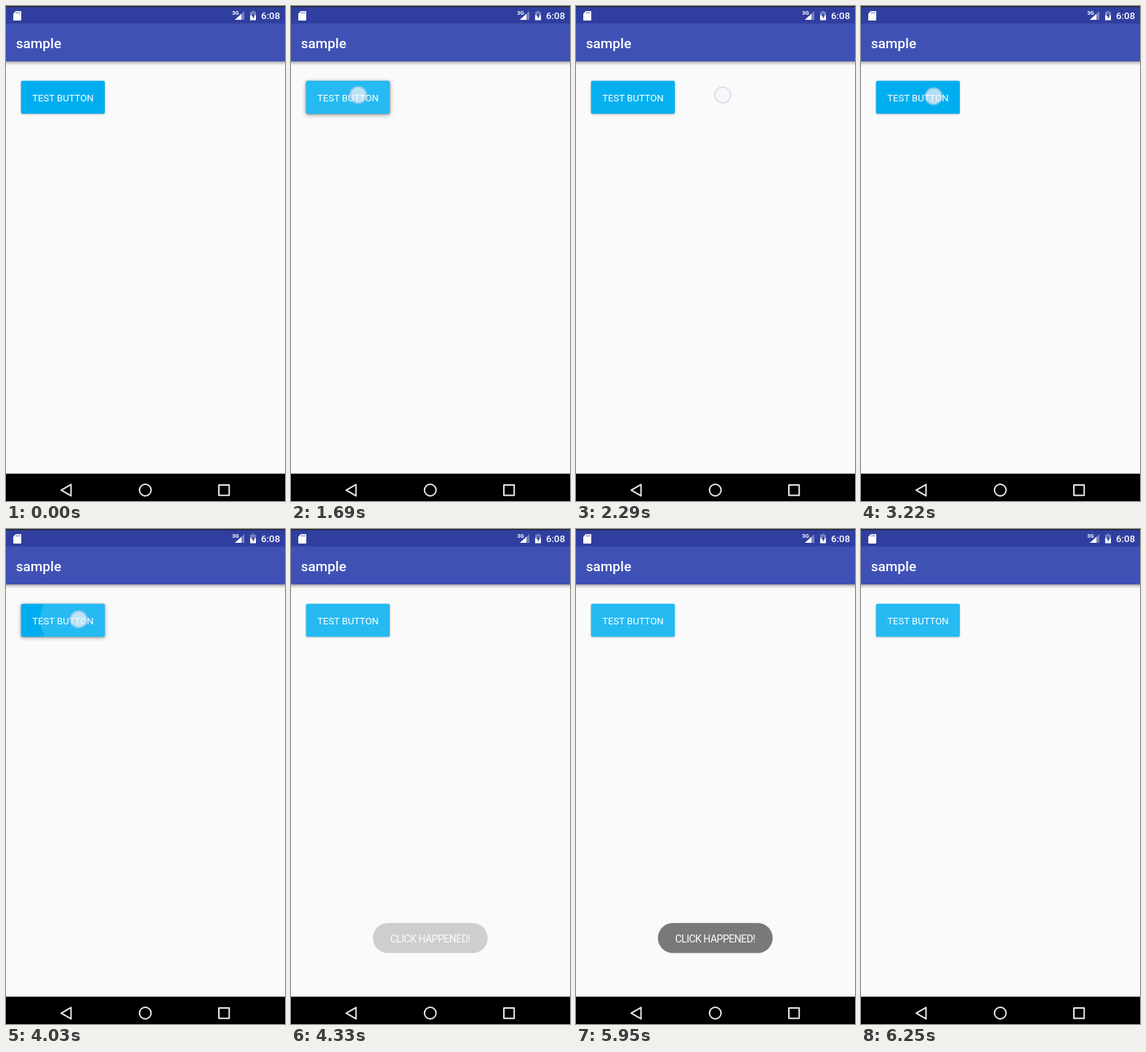
Write an HTML page that moves like this. It is 384 px wide and 680 px high and loops after 6280 ms.

```html
<!DOCTYPE html>
<html lang="en">
<head>
<meta charset="utf-8">
<title>Button press demo</title>
<style>
  html, body { margin: 0; width: 100%; height: 100%; overflow: hidden; background: #fafafa; }
  svg { display: block; font-family: Roboto, sans-serif; }
</style>
</head>
<body>
<svg width="384" height="680" viewBox="0 0 384 680" fill="#fff">
  <defs>
    <linearGradient id="fade" x2="0" y2="1">
      <stop stop-opacity=".38"/>
      <stop offset=".35" stop-opacity=".17"/>
      <stop offset="1" stop-opacity="0"/>
    </linearGradient>
    <filter id="soft" x="-20%" y="-40%" width="140%" height="180%"><feGaussianBlur stdDeviation="3"/></filter>
    <filter id="thin" x="-20%" y="-40%" width="140%" height="180%"><feGaussianBlur stdDeviation=".8"/></filter>
    <rect id="box" x="20.7" y="102.7" width="115.300" height="45.200" rx="2"/>
    <clipPath id="clip"><use href="#box"/></clipPath>
  </defs>

  <!-- status and app bars -->
  <rect y="76" width="384" height="6" fill="url(#fade)"/>
  <rect y="24" width="384" height="52" fill="#3f51b5"/>
  <rect width="384" height="24" fill="#303f9f"/>
  <rect width="384" height="1.500" fill="#25272f"/>
  <path d="M13.500 7H20a1 1 0 0 1 1 1V19a1 1 0 0 1-1 1H11a1 1 0 0 1-1-1V10.500Z"/>
  <path d="M14.200 8.200v2.300M16.300 8.200v2.300M18.400 8.200v2.300" stroke="#303f9f" stroke-width=".8"/>
  <text x="311.300" y="12.300" font-size="7.500" font-weight="700">3G</text>
  <path d="M328 7V19H315Z" opacity=".35"/>
  <path d="M324 10.700V19H315Z"/>
  <path d="M338.500 6.500h3V8H344v5h-8V8h2.500Z" opacity=".35"/>
  <path d="M336 12.500h8V19.500h-8Z"/>
  <path d="M341 9l-3.200 5h1.900v3.800l3-5h-1.700Z" fill="#303f9f"/>
  <text x="351" y="18" font-size="13.300" font-weight="500">6:08</text>
  <text x="13.700" y="58" font-size="19" font-weight="500">sample</text>

  <!-- button -->
  <g id="lift" fill="#000">
    <use href="#box" y="1.500" filter="url(#soft)" opacity=".36"/>
  </g>
  <g fill="#000">
    <use href="#box" y=".8" filter="url(#thin)" opacity=".28"/>
  </g>
  <use href="#box" fill="#00aeef"/>
  <g clip-path="url(#clip)"><circle id="ripple" cy="124" fill-opacity=".15"/></g>
  <text x="36.200" y="130.600" font-size="13.100">TEST BUTTON</text>

  <!-- navigation bar -->
  <rect y="642.500" width="384" height="37.500" fill="#000"/>
  <g fill="none" stroke="#e8e8e8" stroke-width="2" stroke-linejoin="round">
    <path d="M89.500 657.300V672.900L76 665.100Z"/>
    <circle cx="191.700" cy="665" r="8"/>
    <rect x="293" y="658" width="14.200" height="14.200"/>
  </g>

  <g id="toast">
    <rect x="112.700" y="541.300" width="158" height="41.200" rx="20.600" fill="#757575"/>
    <text x="136.500" y="567.700" font-size="14" letter-spacing="-.5">CLICK HAPPENED!</text>
  </g>
  <g id="touch">
    <circle r="12.800" opacity=".2"/>
    <circle r="10.500" fill="#f4f4f8" opacity=".65"/>
    <circle r="11" fill="none" stroke="#c6c6ea" stroke-opacity=".65" stroke-width="1.500"/>
  </g>
</svg>
<script>
const LOOP = 6280, TICK = 30, OFFSET = 10;
const [ripple, lift, toast, touch] =
  ['ripple', 'lift', 'toast', 'touch'].map(id => document.getElementById(id));

// Progress of t from a to b, clamped to 0..1
const ramp = (t, a, b) => Math.min(1, Math.max(0, (t - a) / (b - a)));
const easeOut = p => p * (1.5 - p / 2);

function render(time) {
  const t = Math.floor((time % LOOP - OFFSET) / TICK) * TICK + OFFSET;
  const second = t >= 3220;

  // The finger slides off the button first, then comes back for a tap
  const slide = easeOut(ramp(t, 1670, 2290));
  const x = second ? 100 : 87 + 115 * slide;
  const y = second ? 124 : 124 - 1.7 * ramp(t, 1660, 1690);
  const lifted = second ? ramp(t, 4060, 4210) : ramp(t, 3040, 3190);
  touch.setAttribute('transform', `translate(${x} ${y})`);
  touch.style.opacity = t < 100 ? 0 : 1 - lifted;

  const cancel = ramp(t, 1960, 2350);
  const pressed = t >= (second ? 3880 : 820);
  const radius = second ? 12 + 74 * ramp(t, 3850, 4180) : 35 + 41 * ramp(t, 820, 1360);
  ripple.setAttribute('cx', second ? 100 : 87);
  ripple.setAttribute('r', pressed ? radius : 0);
  ripple.style.opacity = second ? 1 : 1 - cancel;

  lift.style.opacity = second
    ? .8 * (ramp(t, 3850, 4000) - ramp(t, 4120, 4300))
    : ramp(t, 790, 940) - cancel;
  toast.style.opacity = ramp(t, 4200, 4600) - ramp(t, 5940, 6250);
}

const start = performance.now();
function loop() {
  render(performance.now() - start);
  requestAnimationFrame(loop);
}
loop();
</script>
</body>
</html>
```
